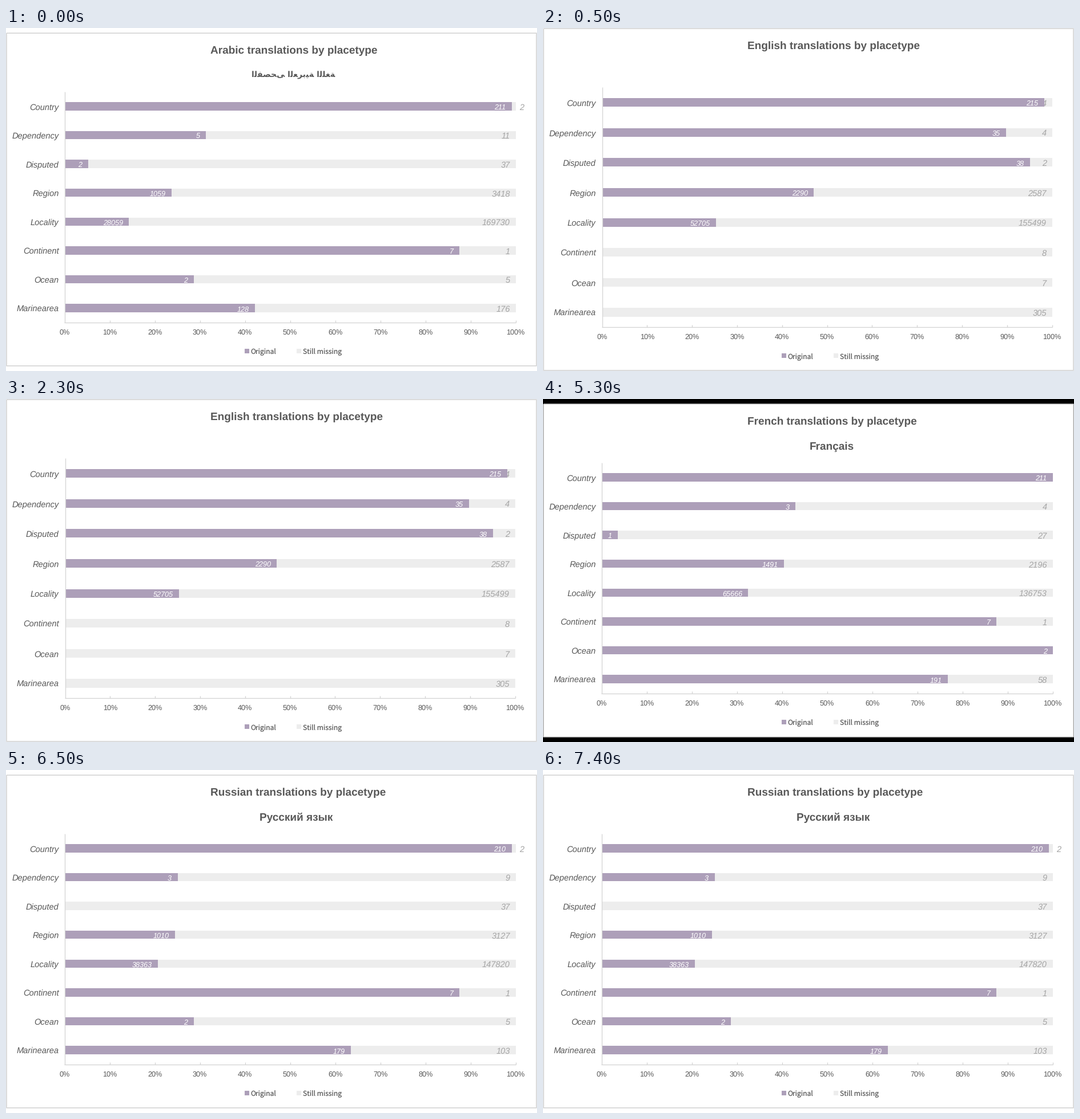
A matplotlib script for the animation above (8 s loop, 930 px wide and 602 px high).

```python
import matplotlib.pyplot as plt
from matplotlib.animation import FuncAnimation
from matplotlib.patches import Rectangle

W, H, DPI = 930, 602, 64
PT = 72 / DPI  # points per pixel

INK, PURPLE, PALE = "#595959", "#ad9fb9", "#ededed"
GREY, LINE = "#a6a6a6", "#d4d4d4"
SANS = "Liberation Sans"

PLACES = ["Country", "Dependency", "Disputed", "Region",
          "Locality", "Continent", "Ocean", "Marinearea"]

# Joined letter forms, set from left to right
ARABIC = ("\ufe8d\ufedf\ufed4\ufebc\ufea4\ufef0 "
          "\ufe8d\ufedf\ufecc\ufeae\ufe91\ufef4\ufe94 "
          "\ufe8d\ufedf\ufee0\ufed0\ufe94")

# Left and right end of the scale, top and base of the plot, panel frame
FULL = dict(x0=104, x1=892, top=104.3, base=525.3, panel=(1, 1, 929, 601))
INSET = dict(x0=103, x1=893, top=112, base=517, panel=(0.7, 9.3, 929.3, 593.3))

CHARTS = [
    dict(lang="Arabic", sub=ARABIC, sub_x=503, sub_font=("DejaVu Sans", 14, 87),
         box=INSET, back="white",
         done=[211, 5, 2, 1059, 28059, 7, 2, 128],
         missing=[2, 11, 37, 3418, 169730, 1, 5, 176]),
    dict(lang="English", sub="", sub_x=0, box=FULL, back="white",
         done=[215, 35, 38, 2290, 52705, 0, 0, 0],
         missing=[4, 4, 2, 2587, 155499, 8, 7, 305]),
    dict(lang="French", sub="Français", sub_x=505.7, box=INSET, back="black",
         done=[211, 3, 1, 1491, 65666, 7, 2, 191],
         missing=[0, 4, 27, 2196, 136753, 1, 0, 58]),
    dict(lang="Russian", sub="Русский язык", sub_x=508, box=INSET, back="white",
         done=[210, 3, 0, 1010, 38363, 7, 2, 179],
         missing=[2, 9, 37, 3127, 147820, 1, 5, 103]),
]
ORDER = [0] * 1 + [1] * 6 + [2] * 6 + [3] * 3  # half-second steps

plt.rcParams["text.hinting"] = "no_hinting"
fig = plt.figure(figsize=(W / DPI, H / DPI), dpi=DPI, facecolor="white")
ax = fig.add_axes([0, 0, 1, 1])


def rect(x0, y0, x1, y1, color, z=1):
    ax.add_patch(Rectangle((x0, y0), x1 - x0, y1 - y0, fc=color, lw=0, zorder=z))


def line(xs, ys, width=1.3):
    ax.plot(xs, ys, color=LINE, lw=width * PT, solid_capstyle="butt", zorder=5)


def text(x, y, s, size, color=INK, ha="left", z=6, font=SANS, **style):
    ax.text(x, y, s, fontsize=size * PT, color=color, ha=ha, va="baseline",
            family=font, zorder=z, **style)


def draw_panel(chart):
    x0, y0, x1, y1 = chart["box"]["panel"]
    rect(0, 0, W, H, chart["back"], 0)
    rect(x0, y0, x1, y1, "white", 0.5)
    line([x0, x1, x1, x0, x0], [y0, y0, y1, y1, y0], 1.6)


def draw_titles(chart):
    base = chart["box"]["top"] - 67.2
    text(358, base, chart["lang"] + " translations by placetype", 19,
         weight="bold")
    font, size, y = chart.get("sub_font", (SANS, 19, 88.7))
    text(chart["sub_x"], y, chart["sub"], size, ha="center", font=font,
         weight="bold")


def draw_rows(chart):
    box = chart["box"]
    x0, x1 = box["x0"], box["x1"]
    step = (box["base"] - box["top"]) / len(PLACES)
    half = step / 7
    for i, (place, done, missing) in enumerate(
            zip(PLACES, chart["done"], chart["missing"])):
        y = box["top"] + step * (i + 0.5)
        end = x0 + (x1 - x0) * done / (done + missing)
        text(92.5, y + 6.2, place, 14.67, ha="right", style="italic")
        rect(x0, y - half, x1, y + half, PALE)
        if missing:
            outside = x1 - end < 10
            text(x1 + 6 if outside else x1 - 10.2, y + 6.2, str(missing), 14.67,
                 GREY, "left" if outside else "right", 2, style="italic")
        if done:
            rect(x0, y - half, end, y + half, PURPLE, 3)
            text(end - 10.3, y + 5.7, str(done), 12.6, "white", "right",
                 style="italic")


def draw_axis(box):
    x0, x1, base = box["x0"] - 0.4, box["x1"] - 0.4, box["base"]
    line([x0, x0], [box["top"], base])
    line([x0 - 0.6, x1 + 0.6], [base, base])
    for k in range(11):
        x = x0 + (x1 - x0) * k / 10
        if k:
            line([x, x], [base - 4, base])
        text(x, base + 20.7, f"{10 * k}%", 12.6, ha="center")


def draw_legend(base):
    for x, color, name in ((417.5, PURPLE, "Original"),
                           (509.3, PALE, "Still missing")):
        rect(x, base + 45.8, x + 8, base + 53.8, color)
        text(x + 10.7, base + 55.2, name, 12.1, font="Noto Sans CJK JP")


def draw(step):
    chart = CHARTS[ORDER[step]]
    ax.clear()
    ax.set(xlim=(0, W), ylim=(H, 0))
    ax.axis("off")
    draw_panel(chart)
    draw_titles(chart)
    draw_rows(chart)
    draw_axis(chart["box"])
    draw_legend(chart["box"]["base"])
    return []


anim = FuncAnimation(fig, draw, frames=len(ORDER), interval=500, repeat=True)
plt.show()
```
